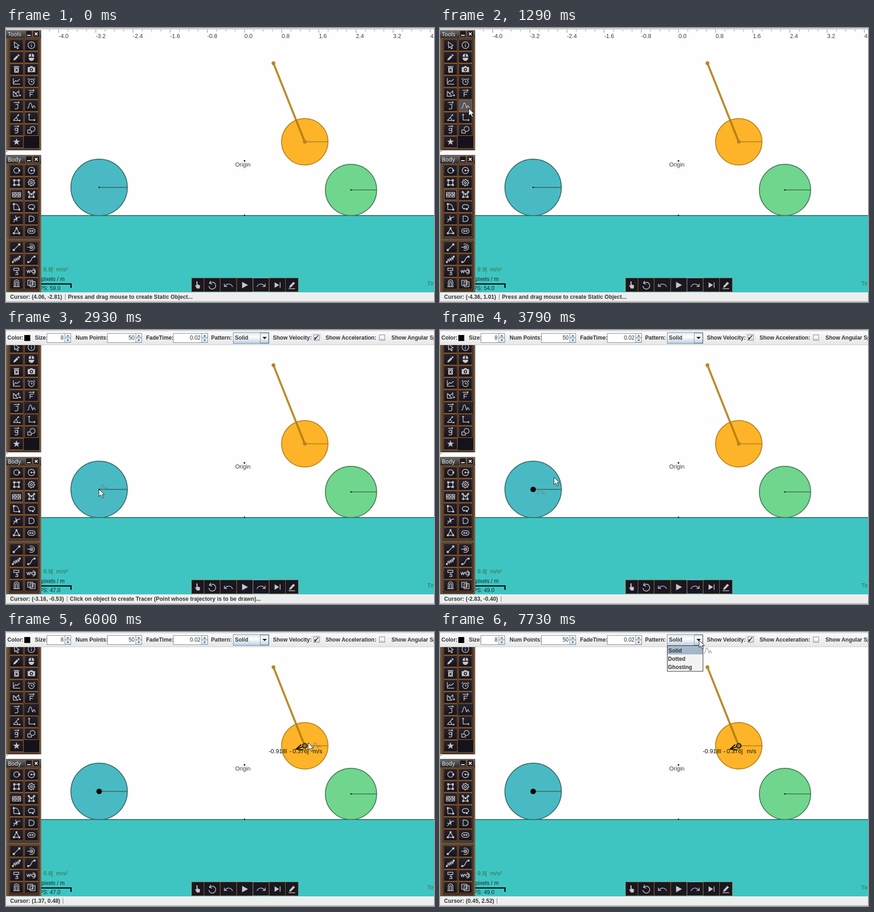
Animation, 935 px wide and 599 px high, one loop 8 s. Source, as an HTML page:

```html
<!DOCTYPE html>
<html lang="en">
<head>
<meta charset="utf-8">
<title>Physics sandbox</title>
<style>
html, body { margin: 0; width: 100%; height: 100%; overflow: hidden; background: #fff; }
svg { position: absolute; left: 0; top: 0; }
text { font: 12px "Liberation Sans", Arial, sans-serif; fill: #333; white-space: pre; }
.bold { font-weight: bold; }
.scale { font-size: 12.5px; fill: #3c3c3c; }
.title { font: 12px "Noto Sans", sans-serif; fill: #e6e6e6; }
.mid { font-size: 13px; }
.green { fill: #35724a; }
.cell { fill: url(#key); stroke: #a0662c; stroke-width: 1.2; }
.cell.hot { fill: #57555b; }
.cell.on { stroke: #4d3a2c; }
.line { fill: none; stroke: #c9c5c2; stroke-width: 1.5; stroke-linejoin: round; }
.solid { fill: #c9c5c2; fill-rule: evenodd; }
.field { fill: #fff; stroke: #7a8a99; }
.steel { fill: url(#steel); stroke: #7a8a99; }
#status { position: absolute; left: 0; top: 578px; width: 935px; height: 21px; box-sizing: border-box;
  background: #eee; border-top: 1px solid #f8f8f8; border-bottom: 2px solid #c4c4c4; padding-left: 9px;
  display: flex; align-items: center; white-space: pre; overflow: hidden;
  font: bold 12px/18px "Liberation Sans", Arial, sans-serif; letter-spacing: .07px; color: #333; }
#status i { width: 1px; height: 12px; margin: 0 6px; background: #777; }
</style>
</head>
<body>
<svg id="stage" width="935" height="599" viewBox="0 0 935 599"></svg>
<div id="status"><span id="coords"></span><i></i><span id="hint"></span></div>
<script>
const $ = id => document.getElementById(id);
const rect = (x, y, w, h, attr) => `<rect x="${x}" y="${y}" width="${w}" height="${h}" ${attr}/>`;
const line = (x1, y1, x2, y2, color, w = 1) =>
  `<path d="M${x1} ${y1}L${x2} ${y2}" stroke="${color}" stroke-width="${w}" stroke-linecap="round"/>`;
const dot = (x, y, r, attr) => `<circle cx="${x}" cy="${y}" r="${r}" ${attr}/>`;
const text = (x, y, s, cls = "", attr = "") => `<text x="${x}" y="${y}" class="${cls}" ${attr}>${s}</text>`;
const ring = (x, y, r) => `M${x - r} ${y}a${r} ${r} 0 1 0 ${2 * r} 0a${r} ${r} 0 1 0 ${-2 * r} 0`;
const box = (x, y, s = 3) => `M${x - s / 2} ${y - s / 2}h${s}v${s}h${-s}z`;
const polar = (n, radius) => "M" + Array.from({ length: n }, (_, i) => {
  const a = i * 2 * Math.PI / n - Math.PI / 2, r = radius(i);
  return (r * Math.cos(a)).toFixed(1) + " " + (r * Math.sin(a)).toFixed(1);
}).join("L") + "Z";

const WAVE = "M-9 5H-7C-5 5-6-6-2-6C1-6 1 5 3 5C4 5 3.5 0 5.5 0C7.5 0 7 5 9 5";

// Each icon: [stroked path, filled path], centred on 0,0
const toolIcons = [
  ["M-5-7L-4 6L-1 3L2 8L4 7L2 2L6 1Z"],
  [ring(0, 0, 7.3) + "M0-1V4M0-4v1.5"],
  ["", "M-7 7L-6 3L1-4L4-1L-3 6ZM2-5l2-2 3 3-2 2z"],
  ["", "M-6-1V-2A6 6 0 0 1-1-8V-1ZM1-8A6 6 0 0 1 6-2V-1H1ZM-6 1H6V2A6 6 0 0 1-6 2Z"],
  ["", "M-6-7H6v2H-6zM-5-4H5V7H-5ZM-3-1L-1 1.5L-3 4L-2 5L0 2.8L2 5L3 4L1 1.5L3-1L2-2L0 .2L-2-2Z"],
  ["", "M-8-5H-4L-2-7H2L4-5H8V6H-8Z" + ring(0, 0.5, 3.6) + "Z" + ring(0, 0.5, 1.8)],
  ["M-7-7V6H8M-6 3L-2-2L1 0L7-5"],
  [ring(0, 1, 6) + "M0-2V1H3M-8-4L-5-7M8-4L5-7"],
  ["M-7-5L-1 0L5-6V1M-7-5V6H3L-5-3M4 4H9M7 2L9 4L7 6"],
  ["M-6-7H6M4-9L6-7L4-5M-3 7V-3H5M-3 2H3"],
  ["M-6-7H6M4-9L6-7L4-5M-2-3H3V4Q3 7 0 7H-4"],
  [WAVE],
  ["M-7 6H7M-7 6L4-6M-1 0Q3 2 2 6", box(4, -6) + box(7, 6)],
  ["M-5-8V5H8M-7-6L-5-8L-3-6M6 3L8 5L6 7"],
  ["M-5-8H5M3-10L5-8L3-6" + ring(-0.5, -1, 3) + "M3-4V4Q3 8-4 6.5"],
  [ring(2.5, -2, 5.5) + "M-3 0H-8V7H0V3"],
  ["", polar(10, i => i % 2 ? 3.2 : 8)]
];
const bodyIcons = [
  [ring(0, 0, 6), box(6, 0, 4)],
  [ring(0, 0, 7), ring(0, 0, 2) + "M3-1H8V1H3Z"],
  ["M-5-5H5V5H-5Z", box(-5, -5, 4.5) + box(5, -5, 4.5) + box(5, 5, 4.5) + box(-5, 5, 4.5)],
  [polar(32, i => i % 4 < 2 ? 7.4 : 5.4) + ring(0, 0, 2.2)],
  ["M-9-5H9V5H-9ZM-9-1.7H9M-9 1.7H9M-3-5V-1.7M4-5V-1.7M-6-1.7V1.7M0-1.7V1.7M6-1.7V1.7M-3 1.7V5M4 1.7V5"],
  ["M-5-5L0-1L5-5L4 5H-4Z", box(-6, -6, 4) + box(6, -6, 4) + box(5, 5, 4) + box(-5, 5, 4) + box(0, -1, 4)],
  ["M-6 6V-6H-1Q5-4 6 6Z", box(-6, -6, 4) + box(6, 6, 4)],
  ["M-3 4C-9 3-8-5 0-5C9-5 9 3 3 4Z", box(3, 5, 4) + box(-3, 4, 3)],
  ["M-7 7L0-1Q2-4 8-4M-2-7L1 5M-7 1H0", box(0, -1, 4)],
  ["M-5-6H0C8-5 8 5 0 6H-5Z"],
  ["M0-6L-6 5H6Z", box(0, -6, 4) + box(-6, 5, 4) + box(6, 5, 4)],
  ["M-3-5H3A5 5 0 0 1 3 5H-3A5 5 0 0 1-3-5ZM-3 0H3", box(-3, 0, 3) + box(3, 0, 3)]
];
const jointIcons = [
  ["M-6 6L6-6", box(-6, 6, 4.5) + box(6, -6, 4.5)],
  [ring(0, 0, 3) + "M-4-6A7 7 0 1 1-4 6M-9 0H-4", ring(0, 0, 1.2)],
  ["M-8 6L-5-1L-3 5L-1-3L1 3L3-5L5 1L7-6", box(-8, 6, 4) + box(7, -6, 4)],
  ["M-6 6C1 6-2-4 6-6", box(-7, 6, 4) + box(7, -6, 4)],
  ["M-6-7H5V-2H-6ZM1-2V3M-2 3H3V7H-3"],
  ["M-10-3L-8 3L-6-3L-4 3L-2-3L0 0" + ring(4, 0, 3) + "M3-6A6 6 0 1 1 3 6"],
  ["M-5 7V-3A5 5 0 0 1 5-3V7H2V-2A2 2 0 0 0-2-2V7ZM-7 7H7"],
  ["M-8-7H3V4H-8ZM-3-4H8V7H-3ZM0-1H5M0 2H5"]
];
const barIcons = [
  ["", "M-3-8h2.4V-1H0l5 1.5-1 7H-2L-6 1l1.5-1L-3 2Z"],
  ["M-5-4A7.5 7.5 0 1 1-7 2M-3-9L-6-4L0-2"],
  ["M-8 3C-4-4 6-4 9 4M-9-3V3H-3"],
  ["", "M-6-7L7 0L-6 7Z"],
  ["M8 3C4-4-6-4-9 4M9-3V3H3"],
  ["M6-6V6", "M-6-6L4 0L-6 6Z"],
  ["M-7 8H7", "M-6 6L-5 2L3-7L7-4L-2 5Z"]
];

const icon = (x, y, [stroke, fill = ""]) =>
  `<g transform="translate(${x} ${y})"><path class="line" d="${stroke}"/><path class="solid" d="${fill}"/></g>`;
const grid = (y0, icons, prefix) => icons.map((ic, i) => {
  const x = i % 2 ? 55.5 : 23, y = +(y0 + (i >> 1) * 26.45).toFixed(1);
  return rect(x - 15, y - 12.5, 30, 25, `class="cell" id="${prefix}${i}"`) + icon(x, y, ic);
}).join("");
const titleBar = (y, name) =>
  rect(1, y, 75, 17, 'fill="url(#cap)"') + text(4, y + 13, name, "title") +
  [43, 59].map(x => rect(x, y + 1, 14, 14, 'fill="#1c1a22" stroke="#9a6a38"')).join("") +
  `<path d="M46 ${y + 11}h8M63 ${y + 5}l6 6m0-6l-6 6" stroke="#eee" stroke-width="2"/>`;
const panel = (y, h) => rect(0.5, y, 76, h, 'fill="url(#rim)" stroke="#6b6259"');
const frame = (y, h) => rect(5.5, y, 68, h, 'fill="#14121b" stroke="#a0662c" stroke-width="1.2"');

const ball = (x, y, r, fill, edge) =>
  dot(x, y, r, `fill="${fill}" stroke="${edge}" stroke-width="2"`) + line(x, y, x + r, y, edge, 2);

function ruler() {
  let out = "";
  for (let i = -21; i <= 20; i++) {
    const x = 521 + i * 20.3, major = i % 4 === 0;
    out += line(x, 4, x, major ? 10 : 7, "#777");
    if (major) out += text(x, 22, (i / 5).toFixed(1), "scale");
  }
  return out;
}

const spinner = (x, w, value) => {
  const b = x + w - 14;
  return rect(x + .5, 7.5, w - 1, 20, 'class="field"') + text(b - 2, 21, value, "", 'text-anchor="end"') +
    rect(b + .5, 7.5, 13, 10, 'class="steel"') + rect(b + .5, 17.5, 13, 10, 'class="steel"') +
    `<path d="M${b + 4} 14h6l-3-3zM${b + 4} 21h6l-3 3z" fill="#444"/>`;
};
const check = (x, on) => rect(x + .5, 10.5, 12, 12, 'class="steel"') +
  (on ? `<path d="M${x + 3} 16v4l7-8" fill="none" stroke="#222" stroke-width="1.8"/>` : "");
const label = (x, s, y = 21) => text(x, y, s, "bold");

const barEdges = [405.5, 432.5, 468, 504, 539.5, 575, 610.5, 638.5];
const playBar = barIcons.map((ic, i) => {
  const x = barEdges[i], w = barEdges[i + 1] - x;
  return rect(x, 546.5, w, 30, `fill="#191722" stroke="${i === 4 ? "#b9a48c" : "#9a6530"}"`) +
    icon(x + w / 2, 562, ic);
}).join("");

$("stage").innerHTML = `
<defs>
  <linearGradient id="cap" x2="0" y2="1"><stop stop-color="#6a6a6a"/><stop offset="1" stop-color="#2b2b2e"/></linearGradient>
  <linearGradient id="rim"><stop stop-color="#8a6f4c"/><stop offset=".08" stop-color="#2c2728"/><stop offset=".94" stop-color="#2c2728"/><stop offset="1" stop-color="#8a6f4c"/></linearGradient>
  <linearGradient id="key" x2="0" y2="1"><stop stop-color="#24222e"/><stop offset="1" stop-color="#16141d"/></linearGradient>
  <linearGradient id="steel" x2="0" y2="1"><stop stop-color="#dde8f3"/><stop offset=".4" stop-color="#fff"/><stop offset="1" stop-color="#b8cfe5"/></linearGradient>
  <linearGradient id="strip" x2="0" y2="1"><stop stop-color="#fdfdfd"/><stop offset="1" stop-color="#e6e6e6"/></linearGradient>
</defs>
${rect(0, 0, 935, 599, 'fill="#fefefe"')}${rect(0, 0, 935, 3, 'fill="#d6d6d6"')}${rect(0, 2, 935, 1, 'fill="#bdbdbd"')}
${ruler()}${line(0, 270, 4, 270, "#666")}
${rect(0, 410, 935, 168, 'fill="#3ec5c2"')}${line(0, 410, 935, 410, "#34706d", 2)}
${ball(203.5, 348.5, 61.7, "#49bac3", "#3b6e6b")}${ball(753.7, 354, 56, "#70d68d", "#497e5c")}
${ball(652.7, 248.8, 50.7, "#feb428", "#b98522")}
${dot(203.5, 348.5, 1.4, "")}${dot(753.7, 354, 1.4, "")}${dot(521, 290.5, 1.7, "")}${dot(521, 409.5, 1.4, "")}
${dot(203.5, 348.5, 6, 'id="tracer"')}
${text(517.5, 303, "Origin", "scale", 'text-anchor="middle"')}
${line(584.3, 77, 652.7, 248.8, "rgba(176,122,12,.85)", 4.5)}${dot(584.3, 77, 4.2, 'fill="#b98628"')}${dot(652.7, 248.8, 4.2, 'fill="#b98222"')}
<g id="velocity">
  ${dot(652.7, 248.8, 5, 'fill="#8f7440" stroke="#1d1608" stroke-width="2"')}
  <path d="M648 251L635 256M645 246L634 256L648 258" fill="none" stroke="#111" stroke-width="2.4"/>
  <text class="mid" y="265" style="fill:#15120c"><tspan x="574">-0.918î</tspan><tspan x="619">-</tspan><tspan x="626">0.376ĵ</tspan><tspan x="670">m/s</tspan></text>
</g>
${text(135, 532, "- 9.8ĵ  m/s²", "mid green", 'text-anchor="end"')}
${text(128, 553, "pixels / m", "", 'text-anchor="end" style="fill:#152b2b"')}
${text(119, 573, "", "", 'id="fps" text-anchor="end" style="fill:#152b2b"')}
<path d="M70 559.5H142V568" fill="none" stroke="#000" stroke-width="2.6"/>
${text(920, 563, "Time: 0.00 s", "mid green")}
${panel(5, 262)}${frame(22.5, 241)}${titleBar(5, "Tools")}${grid(37.5, toolIcons, "tool")}
${panel(278, 184)}${frame(297, 162)}${titleBar(279, "Body")}${grid(311.5, bodyIcons, "body")}
${panel(463, 114)}${frame(464.5, 110)}${grid(479.3, jointIcons, "joint")}
${rect(9.5, 354, 27, 21, 'id="focus" fill="none" stroke="#e4e0dc" stroke-dasharray="1 1.5"')}
${playBar}
<path id="badge" d="${WAVE}" fill="none" stroke="#777" stroke-opacity=".75" stroke-width="1.4"/>
<g id="options">
  ${rect(0, 0, 935, 33, 'fill="url(#strip)"')}${rect(0, 0, 935, 3, 'fill="#dcdcdc"')}${rect(0, 32, 935, 1, 'fill="#cfcfcf"')}
  ${label(3, "Color:")}${rect(40, 11, 13, 13, "")}
  ${label(63, "Size:")}${spinner(89, 53, "8")}
  ${label(152, "Num Points:")}${spinner(221, 76, "50")}
  ${label(306, "FadeTime:")}${spinner(365, 76, "0.02")}
  ${label(448, "Pattern:")}${rect(496.5, 5.5, 78, 24, 'class="steel"')}${rect(555.5, 6.5, 18, 22, 'class="steel"')}
  ${label(500, "Solid")}<path d="M560 15h10l-5 5z" fill="#222"/>
  ${label(583, "Show Velocity:")}${rect(667, 7, 22, 20, 'fill="#e9e9e9"')}${check(672, true)}
  ${label(698, "Show Acceleration:")}${check(815, false)}
  ${label(842, "Show Angular Speed:")}
</g>
<g id="menu">
  ${rect(496.5, 30.5, 78, 55.5, 'fill="#f3f3f3" stroke="#222"')}${rect(497, 32, 77, 17, 'fill="#a3b8cc"')}
  ${label(499, "Solid", 45)}${label(498, "Dotted", 63)}${label(498, "Ghosting", 81)}
</g>
<path id="mouse" d="M0 0V16L4 12.5L7 19L9.5 18L6.8 11.8H12Z" fill="#fff" stroke="#111"/>`;

// Bursts of screen updates: start, end, count
const ticks = [0];
for (const [a, b, n] of [[210, 980, 8], [1070, 1500, 5], [1640, 2060, 5], [2280, 3030, 8], [3150, 3460, 4],
  [3790, 4240, 5], [4450, 4650, 3], [4990, 5220, 3], [5420, 6090, 7], [6400, 7170, 8], [7290, 7730, 5]])
  for (let i = 0; i < n; i++) ticks.push(Math.round((a + (b - a) * i / (n - 1)) / 10) * 10);

// Mouse: time, x, y
const path = [[0, 933, 575.7], [210, 690, 548], [320, 640, 508], [650, 370, 350], [980, 140, 238], [1070, 80, 195],
  [1180, 77.8, 184.5], [1290, 63, 176], [1740, 63, 176], [1850, 85, 202], [1960, 130, 255], [2060, 156.6, 286],
  [2280, 156.6, 286], [2920, 203, 348], [3460, 203, 348], [3790, 249, 322], [4020, 460, 268], [4240, 597, 250],
  [4650, 655, 243], [4990, 656, 241], [5110, 660, 242], [6090, 660, 242], [6400, 652, 215], [6620, 608, 120],
  [6840, 574, 48], [6950, 574, 47], [7060, 567, 35], [7170, 566.6, 34.5], [7290, 566, 26], [7400, 566, 18]];
const fps = [[0, 59], [1290, 54], [2280, 46], [3790, 49], [4990, 48], [6950, 47], [7730, 49]];
const PICK = 1640, TRACE = 3150, VELOCITY = 5420, MENU = 7510;

function at(keys, t) {
  const i = keys.findIndex(k => k[0] > t);
  if (i < 0) return keys[keys.length - 1].slice(1);
  const a = keys[i - 1], b = keys[i], f = (t - a[0]) / (b[0] - a[0]);
  return a.slice(1).map((v, j) => v + (b[j + 1] - v) * f);
}
const pos = i => at(path, ticks[Math.max(i, 0)]);
const inCanvas = i => {
  const [x, y] = pos(i);
  return x > 77 && y < 578 && y > (ticks[i] >= PICK ? 33 : 3);
};
const show = (id, on) => { $(id).style.display = on ? "" : "none"; };
const place = (id, x, y) => $(id).setAttribute("transform", `translate(${x} ${y})`);

function draw(t) {
  let now = ticks.length - 1;
  while (ticks[now] > t) now--;
  const [mx, my] = pos(now);
  place("mouse", mx, my);
  show("mouse", t >= 210);

  // The readout and badge trail the mouse and freeze once it leaves the canvas
  let seen = now;
  while (!inCanvas(seen)) seen--;
  const [x, y] = pos(seen), [px, py] = pos(seen - 1);
  const wx = (px + (x - px) * 2 / 3 - 521) / 101.5, wy = (290.5 - py - (y - py) * 2 / 3) / 101.5;
  $("coords").textContent = `Cursor: (${wx.toFixed(2)}, ${wy.toFixed(2)})`;
  place("badge", px + 18, py + 6);
  show("badge", ticks[seen] > PICK);

  $("hint").textContent = t < PICK ? "Press and drag mouse to create Static Object..."
    : t < TRACE ? "Click on object to create Tracer (Point whose trajectory is to be drawn)..." : "";
  $("fps").textContent = `FPS: ${Math.round(at(fps, ticks[now])[0])}.0`;
  show("options", t >= PICK);
  show("focus", t < TRACE);
  show("tracer", t >= TRACE);
  show("velocity", t >= VELOCITY);
  show("menu", t >= MENU);
  const over = t >= 210 && mx > 40 && mx < 71 && my > 157 && my < 184;
  $("tool11").setAttribute("class", "cell" + (over ? " hot" : t >= PICK ? " on" : ""));
}

const start = performance.now();
(function loop() {
  draw((performance.now() - start) % 8000);
  requestAnimationFrame(loop);
})();
</script>
</body>
</html>
```
